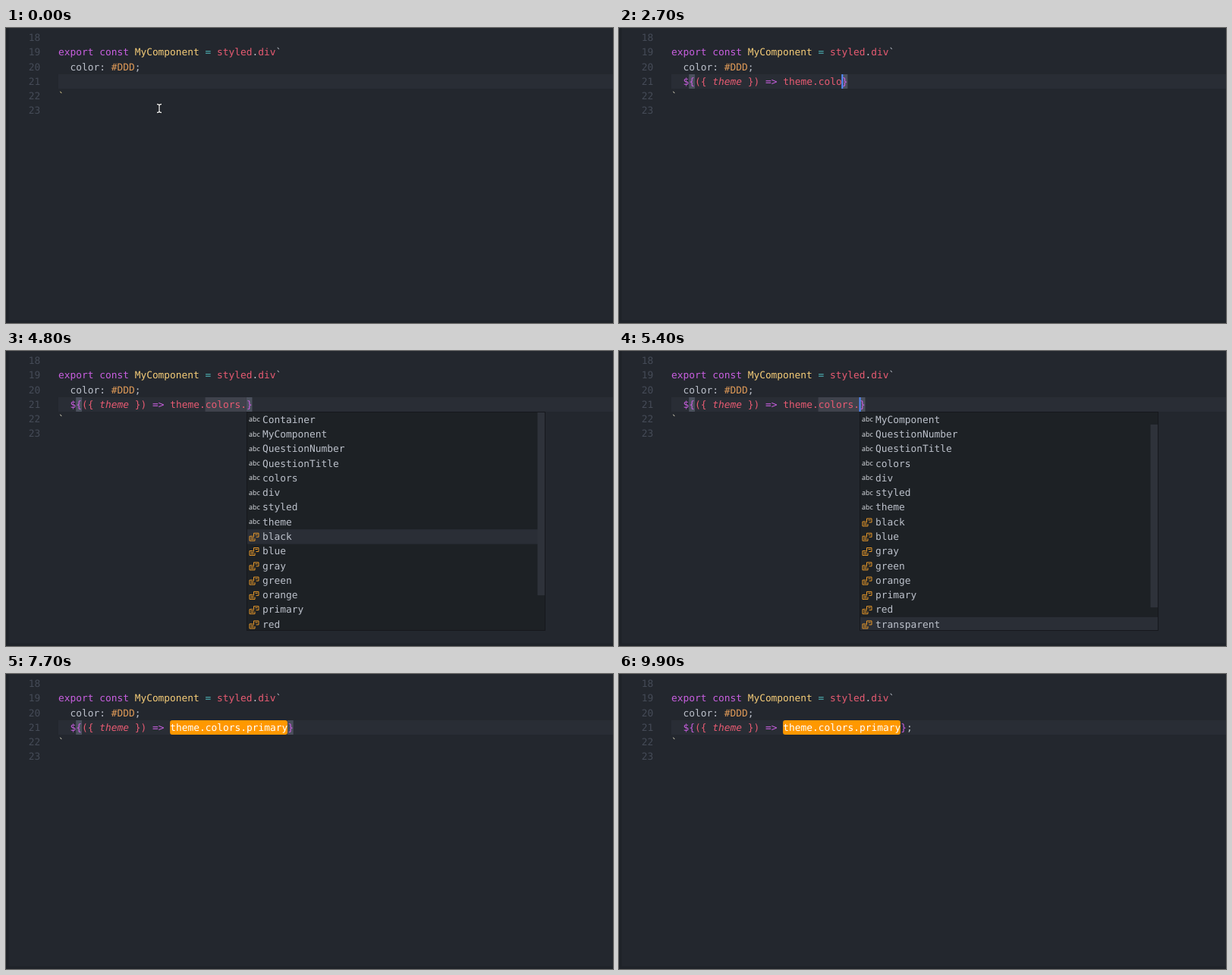
Animation of 800 by 389 pixels, one loop 10000 ms. Source, as an HTML page:

```html
<!DOCTYPE html>
<html lang="en">
<head>
<meta charset="utf-8">
<title>Theme completion</title>
<style>
  html, body { margin: 0; width: 100%; height: 100%; overflow: hidden; background: #23272e; }
  svg { display: block; }
  text {
    font: 12.86px "DejaVu Sans Mono", monospace;
    white-space: pre;
    text-rendering: geometricPrecision;
  }
  .abc { font: 9px "Open Sans", sans-serif; }
</style>
</head>
<body>
<svg id="stage" width="800" height="389" viewBox="0 0 800 389"></svg>
<script>
const stage = document.getElementById('stage');
const LOOP = 10000, STEP = 100;
const LEFT = 69, CHAR = 7.742, LINE = 19.2, ITEM = 19.28, VISIBLE = 15;
const purple = '#c95fe0', red = '#e85b72', yellow = '#f5cc78', orange = '#df9a58',
      cyan = '#4fb5b8', plain = '#bcc1cb', dim = '#454b57';
const code = '${({ theme }) => theme.colors.primary';
const items = ('Container MyComponent QuestionNumber QuestionTitle colors div styled theme ' +
  'black blue gray green orange primary red transparent white yellow').split(' ');
const FIRST_ENUM = 8, LOWEST = 16;

const colX = col => LEFT + col * CHAR;
const rect = (x, y, w, h, fill, more = '') =>
  `<rect x="${x}" y="${y}" width="${w}" height="${h}" fill="${fill}" ${more}/>`;
const span = (str, fill, more = '') => `<tspan fill="${fill}" ${more}>${str}</tspan>`;
const text = (x, y, body) => `<text x="${x}" y="${y}">${body}</text>`;
const baseline = row => 17.2 + row * LINE;

function typedCount(t) {
  if (t < 500) return 0;
  if (t < 1400) return 1 + Math.floor((t - 500) / 900 * 22);
  if (t < 2400) return 23;
  if (t < 3100) return Math.min(29, 24 + Math.floor((t - 2400) / 100));
  return t < 7500 ? 30 : code.length;
}

// Closing brackets the editor inserts by itself.
function closers(typed) {
  const pairs = { '{': '}', '(': ')' };
  let open = '';
  for (const c of typed) {
    if (pairs[c]) open = pairs[c] + open;
    else if (c === open[0]) open = open.slice(1);
  }
  return open;
}

function caretOn(t) {
  const blink = from => (t - from) % 1000 < 500;
  if (t < 1400) return t >= 200;
  if (t < 2400) return blink(1400);
  if (t < 3100) return true;
  if (t < 9200) return blink(3100);
  return t < 9900;
}

// The key repeats every 90 ms on the way down; then single steps up.
const lowestReached = t => t < 4100 ? 0 : Math.min(LOWEST, 1 + Math.floor((t - 4100) / 90));
const stepsUp = t => (t >= 6500) + (t >= 6800) + (t >= 7100);

function codeLine(t) {
  const n = typedCount(t), typed = code.slice(0, n), tail = closers(typed);
  const chip = t >= 7700, done = t >= 9500, y = baseline(3);
  let out = '', body = '  ';
  if (tail === '}' && !done)
    for (const col of [3, n + 2])
      out += rect(colX(col), 61, CHAR, 19, '#4b505d');
  if (t >= 3300 && t < 7500) out += rect(colX(25), 61, 7 * CHAR, 19, '#3f424c');
  if (chip) out += rect(colX(19), 61, 20 * CHAR, 19, '#ff9800', 'rx="3"');

  [...typed].forEach((c, i) => {
    const fill = chip && i > 16 ? '#fff' : i < 2 || '=>'.includes(c) ? purple : red;
    body += span(c, fill, i > 4 && i < 10 ? 'font-style="italic"' : '');
  });
  if (tail) body += span(tail.slice(0, -1), red) + span('}', purple);
  if (done) body += span(';', plain);
  out += text(LEFT, y, body);

  const caret = 2 + n + (t >= 9200) + done;
  if (caretOn(t)) out += rect(colX(caret) - .2, 61, 2, 19, '#528bff');
  return out;
}

const enumIcon = y => `<path transform="translate(320.5 ${y})" fill="none" stroke="#e8992a"
  d="M5 4.5H.5V10.5H7.5V7.5M2 6.5H6M2 8.5H6M6 5.5V.5H12.5V5.5H9M8 2.5H11"/>`;

function popup(t) {
  const lowest = lowestReached(t), selected = lowest - stepsUp(t);
  const scroll = Math.max(0, lowest - VISIBLE + 1);
  const x = 317, top = 81, height = 287;
  let out = rect(x + .5, top - .5, 393, height + 1, '#1d2125', 'stroke="#16181d"');
  out += '<g clip-path="url(#list)">';
  items.slice(scroll, scroll + VISIBLE).forEach((label, row) => {
    const y = top + row * ITEM, index = row + scroll;
    if (index === selected) out += rect(x + 1, y, 392, ITEM, '#2a2e36');
    out += index < FIRST_ENUM
      ? `<text class="abc" x="320" y="${y + 12.3}" fill="#e0e3e8">abc</text>`
      : enumIcon(y + 4.5);
    out += text(338, y + 13.8, span(label, plain));
  });
  out += '</g>';
  const scale = height / items.length;
  return out + rect(700.5, top + scroll * scale, 9.5, VISIBLE * scale + 2, '#2e323a');
}

function iBeam() {
  const d = 'M199 100.5Q202 100.5 202 102.5Q202 100.5 205 100.5M202 102V110M199 111.5Q202 111.5 202 109.5Q202 111.5 205 111.5';
  return `<g fill="none"><path d="${d}" stroke="#14171b" stroke-width="3"/><path d="${d}" stroke="#eee" stroke-width="1.3"/></g>`;
}

function draw(t) {
  let out = '<clipPath id="list"><rect x="317" y="81" width="393" height="287"/></clipPath>';
  out += rect(0, 0, 800, 389, '#23272e') + rect(0, 0, 3.5, 389, '#1e2228') +
    rect(0, 385.5, 800, 3.5, '#1f2329') + rect(LEFT, 61, 731, 19, '#292d35');
  for (let row = 0; row < 6; row++) out += text(29.8, baseline(row), span(18 + row, dim));
  out += text(LEFT, baseline(1), span('export const ', purple) + span('MyComponent ', yellow) +
    span('= ', cyan) + span('styled', red) + span('.', plain) + span('div', red) + span('`', plain));
  out += text(LEFT, baseline(2), span('  color: ', plain) + span('#DDD', orange) + span(';', plain));
  out += codeLine(t);
  out += text(LEFT, baseline(4), span('`', t < 500 ? '#dccb8c' : '#cfcbb4'));
  if (t >= 1100 && t < 1700)
    out += '<path d="M69 98q2-2.5 4-.5t4-.5" fill="none" stroke="#d5414b" stroke-width="1.2"/>';
  if (t < 500) out += iBeam();
  if (t >= 3200 && t < 7500) out += popup(t);
  stage.innerHTML = out;
}

const start = performance.now();
let last = -1;
function tick() {
  const t = Math.floor((performance.now() - start) % LOOP / STEP) * STEP;
  if (t !== last) draw(last = t);
  requestAnimationFrame(tick);
}
tick();
</script>
</body>
</html>
```
